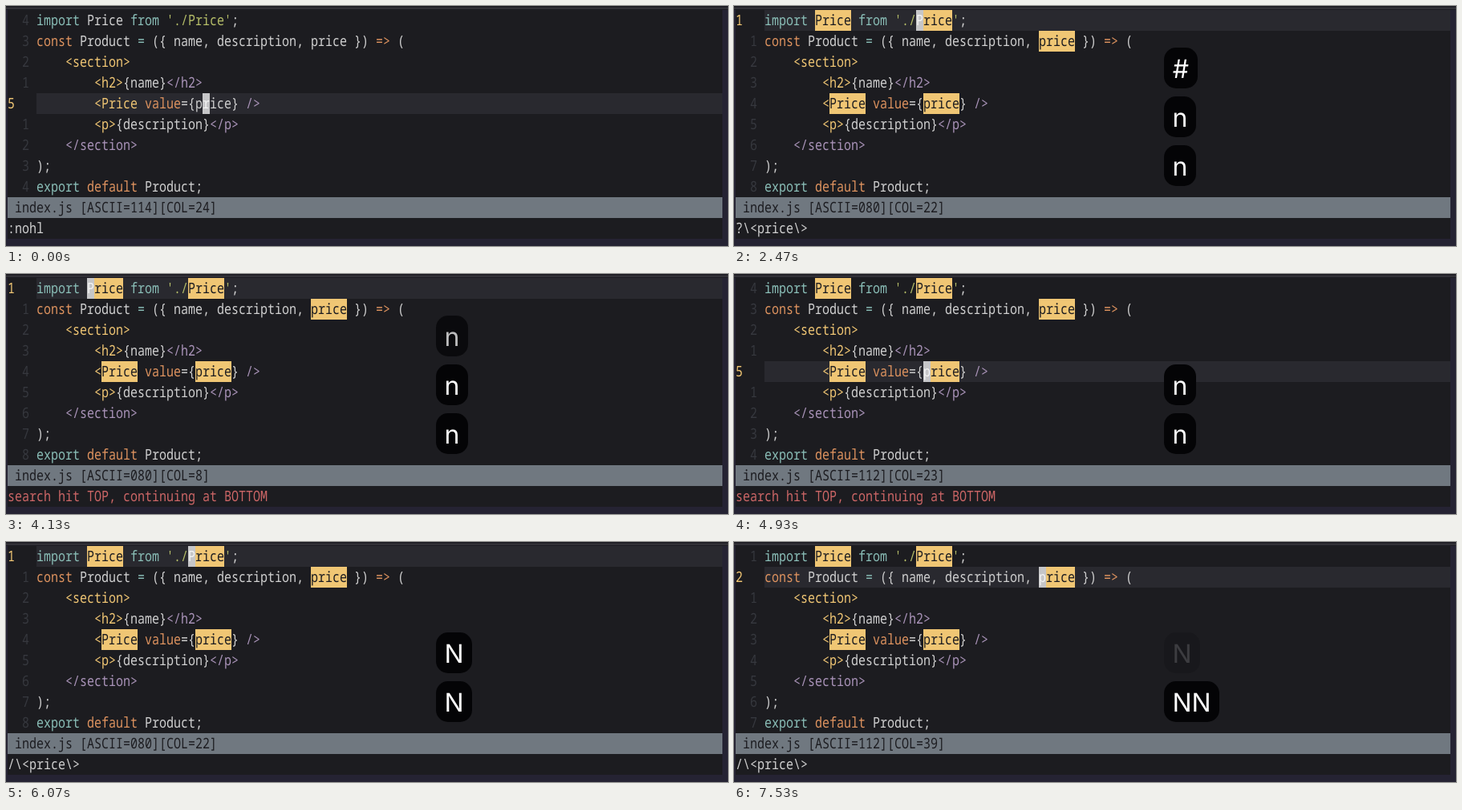
Recreate the animation shown at these times as an HTML page. Size 900x300 px, loop 7590 ms.

```html
<!DOCTYPE html>
<html lang="en">
<head>
<meta charset="utf-8">
<title>Searching the word under the cursor</title>
<style>
  html, body { margin: 0; width: 100%; height: 100%; overflow: hidden; background: #252333; }
  svg { display: block; width: 900px; height: 300px; }
  text { white-space: pre; text-rendering: geometricPrecision; }
  .code { font: 15px "Noto Sans Mono", "DejaVu Sans Mono", monospace; font-variant-ligatures: none; }
  .key { font: 32px Inter, "Open Sans", sans-serif; fill: #fff; }
</style>
</head>
<body>
<svg id="stage" viewBox="0 0 900 300"></svg>
<script>
const LOOP = 7590, CELL = 9, ROW = 26, LEFT = 2, CODE = 38, TOP = 5, RIGHT = 893;
const TALL = 1.22; // the editor face is narrow: one vertical scale for all code
const C = {
  bg: "#1c1c20", line: "#29292f", fg: "#d0d0d0", dim: "#36383e", bar: "#707880",
  teal: "#8abeb7", orange: "#de935f", yellow: "#f0c674", green: "#b5bd68",
  purple: "#a993b8", red: "#cc6666", cursor: "#c6c6c8"
};

const LINES = [
  [["teal", "import"], ["fg", " Price "], ["teal", "from"], ["green", " './Price'"], ["fg", ";"]],
  [["orange", "const"], ["fg", " Product "], ["teal", "="], ["fg", " ({ name, description, price }) "],
   ["orange", "=>"], ["fg", " ("]],
  [["yellow", "    <section>"]],
  [["yellow", "        <h2>"], ["fg", "{name}"], ["purple", "</h2>"]],
  [["yellow", "        <Price"], ["orange", " value"], ["fg", "={price} "], ["purple", "/>"]],
  [["yellow", "        <p>"], ["fg", "{description}"], ["purple", "</p>"]],
  [["purple", "    </section>"]],
  [["fg", ");"]],
  [["teal", "export"], ["orange", " default"], ["fg", " Product;"]]
];
const plain = LINES.map(parts => parts.map(p => p[1]).join(""));

// Cursor stops: time, row, column
const MOVES = [
  [0, 4, 23], [800, 4, 9], [1800, 1, 38], [2330, 0, 21], [3270, 0, 7],
  [4870, 4, 22], [5530, 0, 7], [6000, 0, 21], [6470, 1, 38]
];
// Command line: time, text, colour
const MESSAGES = [
  [0, ":nohl", C.fg],
  [800, "?\\<price\\>", C.fg],
  [4000, "search hit TOP, continuing at BOTTOM", C.red],
  [5530, "search hit BOTTOM, continuing at TOP", C.red],
  [6000, "/\\<price\\>", C.fg]
];
// Key bubbles: times of the presses joined in each one
const KEYS = [
  ["#", 800], ["n", 1800], ["n", 2330], ["n", 3270], ["n", 4000],
  ["N", 5530], ["N", 6000, 6470]
];
const BUBBLE = { "#": 42, n: 40, N: 45, NN: 69 };
const HOLD = 1700, FADE = 350;

const stage = document.getElementById("stage");

function add(tag, attrs, parent = stage) {
  const el = document.createElementNS("http://www.w3.org/2000/svg", tag);
  for (const k in attrs) el.setAttribute(k, attrs[k]);
  return parent.appendChild(el);
}
function box(x, y, width, height, fill, parent) {
  return add("rect", { x, y, width, height, fill }, parent);
}
const rowY = row => TOP + ROW * row;
const at = (x, row) => `translate(${x} ${rowY(row) + 19}) scale(1 ${TALL})`;

function write(x, row, str, fill, parent) {
  const el = add("text", { class: "code", transform: at(x, row), fill }, parent);
  el.textContent = str;
  return el;
}

// Window
box(0, 0, 900, 5, "#1f1e25");
box(0, 2, 900, 1.5, "#3a393f");
box(LEFT, TOP, RIGHT - LEFT, 286, C.bg);
const lineBar = box(CODE, TOP, RIGHT - CODE, ROW, C.line);
box(LEFT, rowY(9), RIGHT - LEFT, ROW, C.bar);

// Code
const numbers = LINES.map((parts, row) => {
  const el = write(CODE, row, "", C.fg);
  for (const [color, str] of parts) add("tspan", { fill: C[color] }, el).textContent = str;
  return write(20, row, "", C.dim);
});

// Search matches
const matches = add("g", {});
plain.forEach((str, row) => {
  for (const m of str.matchAll(/\bprice\b/gi)) {
    const x = CODE + m.index * CELL;
    box(x, rowY(row), m[0].length * CELL, ROW, C.yellow, matches);
    write(x, row, m[0], C.bg, matches);
  }
});

const cursor = box(0, 0, CELL, ROW, C.cursor);
const letter = write(0, 0, "", "#f4f4f4");
const status = write(LEFT, 9, "", C.bg);
const message = write(LEFT, 10, "", C.fg);

const bubbles = KEYS.map(() => {
  const g = add("g", {});
  const back = add("rect", { width: 40, height: 51, rx: 15, fill: "#040406" }, g);
  const label = add("text", { class: "key", x: 20, y: 38, "text-anchor": "middle" }, g);
  return { g, back, label };
});

const latest = (steps, t) => steps.filter(s => s[0] <= t).pop();

function drawEditor(t) {
  const [, row, col] = latest(MOVES, t);
  const y = rowY(row), x = CODE + col * CELL, char = plain[row][col];
  lineBar.setAttribute("y", y);
  numbers.forEach((el, i) => {
    const here = i === row;
    el.textContent = here ? row + 1 : Math.abs(i - row);
    el.setAttribute("fill", here ? C.yellow : C.dim);
    el.setAttribute("transform", at(here ? LEFT : 20, i));
  });
  matches.setAttribute("visibility", t < 800 ? "hidden" : "visible");
  cursor.setAttribute("x", x);
  cursor.setAttribute("y", y);
  letter.textContent = char;
  letter.setAttribute("transform", at(x, row));
  const code = String(char.charCodeAt(0)).padStart(3, "0");
  status.textContent = ` index.js [ASCII=${code}][COL=${col + 1}]`;
  const [, str, fill] = latest(MESSAGES, t);
  message.textContent = str;
  message.setAttribute("fill", fill);
}

function drawKeys(t) {
  const shown = KEYS.filter(k => k[1] <= t).length;
  KEYS.forEach(([key, ...times], i) => {
    const { g, back, label } = bubbles[i];
    const hits = times.filter(s => s <= t);
    const age = hits.length ? t - hits[hits.length - 1] : Infinity;
    const alpha = Math.max(0, Math.min(1, 1 - (age - HOLD) / FADE));
    g.setAttribute("opacity", alpha);
    if (!alpha) return;
    const str = key.repeat(hits.length), width = BUBBLE[str];
    g.setAttribute("transform", `translate(536 ${174 - 61 * (shown - 1 - i)})`);
    back.setAttribute("width", width);
    label.setAttribute("x", width / 2);
    label.textContent = str;
  });
}

function frame() {
  const t = performance.now() % LOOP;
  drawEditor(t);
  drawKeys(t);
  requestAnimationFrame(frame);
}
frame();
</script>
</body>
</html>
```
